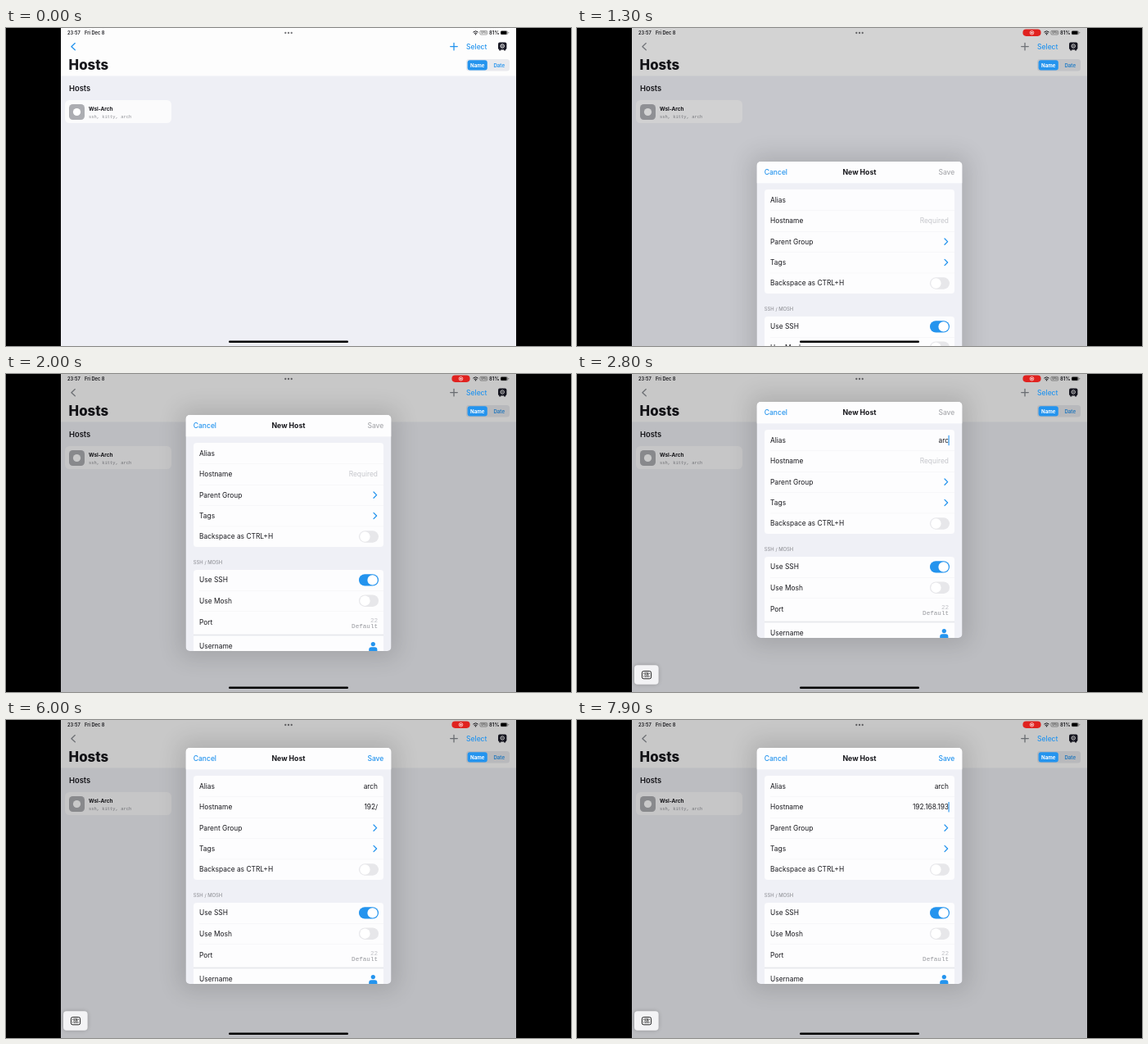
An HTML page for the animation above (8000 ms loop, 690 px wide and 388 px high).

```html
<!DOCTYPE html>
<html lang="en">
<head>
<meta charset="utf-8">
<title>New host form</title>
<style>
  html, body { margin: 0; width: 100%; height: 100%; overflow: hidden; background: #000; }
  svg { display: block; width: 100%; height: 100%; }
  text { font-family: Inter, Roboto, sans-serif; white-space: pre; }
  .mono { font-family: "Liberation Mono", "DejaVu Sans Mono", monospace; }
</style>
</head>
<body>
<svg id="stage" viewBox="0 0 690 388"></svg>
<script>
const LOOP = 8000, STEP = 100;
const BLUE = '#2494ee', INK = '#17171c', GREY = '#a9aaae';

// Markup helpers; text is placed by its vertical middle
const rect = (x, y, w, h, fill, r = 0, more = '') =>
  `<rect x="${x}" y="${y}" width="${w}" height="${h}" rx="${r}" fill="${fill}" ${more}/>`;
const disc = (x, y, r, fill, more = '') =>
  `<circle cx="${x}" cy="${y}" r="${r}" fill="${fill}" ${more}/>`;
const line = (d, stroke, width, more = '') =>
  `<path d="${d}" fill="none" stroke="${stroke}" stroke-width="${width}" stroke-linecap="round" stroke-linejoin="round" ${more}/>`;
const text = (x, y, str, size, weight = 400, fill = INK, more = '') =>
  `<text x="${x}" y="${(y + size * 0.36).toFixed(2)}" font-size="${size}" font-weight="${weight}" fill="${fill}" ${more}>${str}</text>`;
const group = (id, body, more = '') => `<g id="${id}" ${more}>${body}</g>`;
const END = 'text-anchor="end"', MID = 'text-anchor="middle"';

function statusBar() {
  const wifi = line('M570.7 4.9Q573.5 2.3 576.3 4.9M572 6.4Q573.5 5.1 575 6.4', INK, 1) +
    disc(573.5, 7.7, 0.8, INK);
  const vpn = rect(578.8, 3.4, 9, 4.6, 'none', 1.2, 'stroke="#666" stroke-width=".6"') +
    text(583.3, 5.7, 'VPN', 3.1, 600, '#555', MID);
  const battery = rect(603.8, 3.2, 9, 5, '#999', 1.5) + rect(604.3, 3.7, 7, 4, '#000', 1) +
    rect(613.3, 4.8, 0.8, 1.8, '#888', 0.4);
  return text(75, 5.7, '23:57', 5.7, 600) + text(96, 5.7, 'Fri Dec 8', 5.7, 600) +
    [341.3, 345, 348.7].map(x => disc(x, 6, 1.15, '#77777b')).join('') +
    wifi + vpn + text(590, 5.7, '81%', 6, 600) + battery;
}

function page() {
  const vault = rect(601, 17.5, 10.4, 9, '#1b1b27', 2) +
    rect(602.3, 26, 2, 1.5, '#1b1b27') + rect(608.1, 26, 2, 1.5, '#1b1b27') +
    disc(606.2, 22, 2.2, 'none', 'stroke="#fff" stroke-width="1"') + disc(606.2, 22, 0.7, '#fff');
  const hostCard = rect(72, 88, 130, 28, '#fbfbfc', 5.5) + rect(77, 93, 19, 19, '#acadb2', 4.5) +
    disc(86.5, 102.5, 4.6, '#fff') + text(101, 98.4, 'Wsl-Arch', 6.4, 700) +
    text(101, 107.6, 'ssh, kitty, arch', 5.45, 400, '#8f9096', 'class="mono"');
  return rect(67, 0, 556, 388, '#eeeff5') + rect(67, 0, 556, 58.5, '#fdfdfd') + statusBar() +
    line('M84.3 18.6L79.9 22.7L84.3 26.8', BLUE, 1.3, 'id="back"') +
    line('M547 18.3V26.9M542.7 22.6H551.3', BLUE, 1.3, 'id="plus"') +
    vault + text(76.6, 45.3, 'Hosts', 16.8, 800) +
    rect(562, 38, 53, 14.6, '#e9eaee', 3.5) + text(602.2, 45.4, 'Date', 6.1, 600, BLUE, MID) +
    text(77, 73.5, 'Hosts', 9.4, 600) + hostCard;
}

function brightControls() {
  return text(562, 22.6, 'Select', 8.5, 500, BLUE) + rect(563.6, 39.2, 24.2, 12.3, BLUE, 3) +
    text(575.7, 45.4, 'Name', 6.1, 700, '#fff', MID) +
    group('pill', rect(544.4, 1.6, 22.2, 8.3, '#e0221f', 4.1) +
      disc(555.5, 5.75, 2.3, 'none', 'stroke="#fff" stroke-width=".7"') + disc(555.5, 5.75, 1.1, '#fff'));
}

function menu() {
  const server = [37.6, 40.2, 42.8].map(y => rect(544, y, 7, 2, '#333', 0.5) +
    rect(548.2, y + 0.7, 1.9, 0.6, '#fff')).join('');
  const checker = rect(544, 53.4, 3.4, 3.4, '#333', 0.6) + rect(547.5, 56.8, 3.4, 3.4, '#333', 0.6) +
    rect(548, 53.6, 2.6, 2.6, '#aaa', 0.5) + rect(544.3, 57.2, 2.6, 2.6, '#aaa', 0.5);
  return rect(473, 37, 86, 38, '#000', 6, 'opacity=".13" filter="url(#soft)"') +
    rect(475, 33, 82, 36, '#fafafb', 4.5) +
    `<path id="pressed" d="M475 49V37.5Q475 33 479.5 33H552.5Q557 33 557 37.5V49Z" fill="#ebebec"/>` +
    rect(475, 48.7, 82, 0.5, '#dedee0') +
    text(480, 41, 'New Host', 6.1, 400, '#333') + text(480, 56.8, 'New Group', 6.1, 400, '#333') +
    server + checker;
}

// The form is drawn with its top edge at y = 0
function form() {
  const label = (y, str) => text(236, y, str, 8.4, 400);
  const rule = y => rect(236, y, 225, 0.5, '#f0f0f2');
  const chevron = y => line(`M449 ${y - 3.6}L452.6 ${y}L449 ${y + 3.6}`, BLUE, 1.3);
  const toggle = (y, on) => rect(431, y - 7.2, 24, 14.4, on ? BLUE : '#e7e7ea', 7.2) +
    disc(on ? 447.6 : 438.4, y, 6.2, '#fff');
  const field = (id, y) => text(454, y, '', 8.3, 400, INK, `id="${id}" ${END}`) +
    rect(453.5, y - 6.2, 1.1, 12.4, BLUE, 0, `id="${id}Caret"`);
  const first = rect(229, 34, 232, 127, '#fdfdfe', 4) + [59.5, 85, 110.3, 135.7].map(rule).join('') +
    label(47, 'Alias') + label(72.2, 'Hostname') + label(97.6, 'Parent Group') +
    label(123, 'Tags') + label(148.3, 'Backspace as CTRL+H') +
    text(454, 72.2, 'Required', 8.4, 400, '#c5c6cb', `id="hint" ${END}`) +
    field('alias', 47) + field('host', 72.2) + chevron(97.6) + chevron(123) + toggle(148.5, false);
  const second = rect(229, 189, 232, 110, '#fdfdfe', 4) + [214, 239.5].map(rule).join('') +
    label(201.4, 'Use SSH') + toggle(201.4, true) + label(226.7, 'Use Mosh') + toggle(226.7, false) +
    label(253.4, 'Port') + text(454, 250.2, '22', 7.6, 400, '#c0c1c6', `class="mono" ${END}`) +
    text(454, 257.6, 'Default', 7.6, 400, '#96979c', `class="mono" ${END}`) +
    rect(229, 267.6, 232, 1.8, '#e7e8ec') + label(282.2, 'Username') +
    disc(448.3, 279.6, 2.6, BLUE) +
    `<path d="M443.2 288V286.6Q443.2 283.3 446.3 283.3H450.3Q453.4 283.3 453.4 286.6V288Z" fill="${BLUE}"/>`;
  const sheet = rect(219.5, 0, 251, 288, '#eff0f6') + rect(219.5, 0, 251, 26.3, '#fdfdfe') +
    text(228.8, 12.8, 'Cancel', 8.5, 500, BLUE) + text(345, 12.8, 'New Host', 8.7, 700, INK, MID) +
    text(461.3, 12.8, 'Save', 8.5, 500, GREY, `id="save" ${END}`) +
    first + text(228.8, 180.3, 'SSH / MOSH', 5.9, 400, '#85868c') + second;
  return rect(212, -8, 266, 304, '#000', 8, 'opacity=".13" filter="url(#soft)"') +
    `<g clip-path="url(#sheet)">${sheet}</g>`;
}

function keyboardButton() {
  return rect(69.5, 355, 30.5, 24, '#000', 5, 'opacity=".18" filter="url(#tight)"') +
    rect(70, 355.3, 29.6, 23.4, '#f3f3f5', 4) +
    rect(79.4, 362.6, 11.2, 9.2, 'none', 2, 'stroke="#222" stroke-width="1"') +
    text(85, 365.4, 'EN', 3.7, 700, '#222', MID) + text(85, 369, 'US', 3.7, 700, '#222', MID) +
    line('M81.2 365.4H81.8M88.2 365.4H88.8M81.2 369H81.8M88.2 369H88.8', '#222', 0.7);
}

const stage = document.getElementById('stage');
stage.innerHTML = `<defs>
  <clipPath id="screen"><rect x="67" width="556" height="388"/></clipPath>
  <clipPath id="sheet"><rect x="219.5" width="251" height="288" rx="5"/></clipPath>
  <filter id="soft" x="-60%" y="-120%" width="220%" height="340%"><feGaussianBlur stdDeviation="14"/></filter>
  <filter id="tight" x="-50%" y="-50%" width="200%" height="200%"><feGaussianBlur stdDeviation="2.5"/></filter>
  </defs>` + rect(0, 0, 690, 388, '#000') +
  `<g clip-path="url(#screen)">` + page() +
  rect(67, 0, 556, 388, '#000', 0, 'id="dim"') + brightControls() +
  group('menu', menu()) + group('form', form()) + group('keys', keyboardButton()) +
  rect(272, 381.6, 146, 2.5, '#000', 1.25) + '</g>';

const $ = id => document.getElementById(id);
const show = (id, on) => $(id).setAttribute('visibility', on ? 'visible' : 'hidden');
const fill = (id, name, value) => $(id).setAttribute(name, value);
const clamp = v => Math.max(0, Math.min(1, v));
const easeOut = v => 1 - (1 - clamp(v)) ** 3;

// Each field starts with its focus time, followed by its edits
const aliasKeys = [[2200, ''], [2500, 'a'], [2700, 'ar'], [2800, 'arc'], [2900, 'arch']];
const hostKeys = [[4200, ''], [4500, '1'], [4700, '19'], [5000, '192'], [5500, '192/'], [6200, '192'],
  [6400, '192.'], [6500, '192.1'], [6600, '192.16'], [6700, '192.168'], [7100, '192.168.'],
  [7600, '192.168.1'], [7700, '192.168.19'], [7900, '192.168.193']];

function updateField(id, keys, t, focused) {
  const last = keys.filter(([at]) => at <= t).pop();
  const value = last ? last[1] : '';
  $(id).textContent = value;
  show(id + 'Caret', focused && last && (t - last[0]) % 800 < 500);
  return value;
}

function draw(t) {
  const modal = t >= 1300, menuOpen = t >= 500 && !modal;
  show('pill', t >= 300);

  const grow = 0.3 + 0.7 * easeOut((t - 500) / 350);
  show('menu', menuOpen);
  fill('menu', 'transform', `translate(547 30) scale(${grow}) translate(-547 -30)`);
  fill('menu', 'opacity', clamp((t - 400) / 300));
  show('pressed', menuOpen && t >= 1100);
  fill('back', 'stroke', modal ? '#8b8e94' : BLUE);
  fill('plus', 'stroke', modal ? '#85898f' : t >= 400 ? '#a9bac8' : BLUE);

  show('dim', modal);
  fill('dim', 'opacity', 0.17 + 0.04 * clamp((t - 1300) / 300));
  const rise = 113 * Math.exp(-(t - 1300) / 120) * (1 - clamp((t - 1800) / 200));
  const top = 50 + rise - 16 * easeOut((t - 2100) / 400);
  show('form', modal);
  if (modal) fill('form', 'transform', `translate(0 ${top.toFixed(2)})`);
  show('keys', t >= 2300);

  updateField('alias', aliasKeys, t, modal && t < 4200);
  const host = updateField('host', hostKeys, t, modal);
  show('hint', modal && !host);
  fill('save', 'fill', host ? BLUE : GREY);
}

const start = performance.now();
function tick(now) {
  const t = Math.max(0, now - start) % LOOP;
  draw(Math.floor(t / STEP) * STEP);
  requestAnimationFrame(tick);
}
draw(0);
requestAnimationFrame(tick);
</script>
</body>
</html>
```
